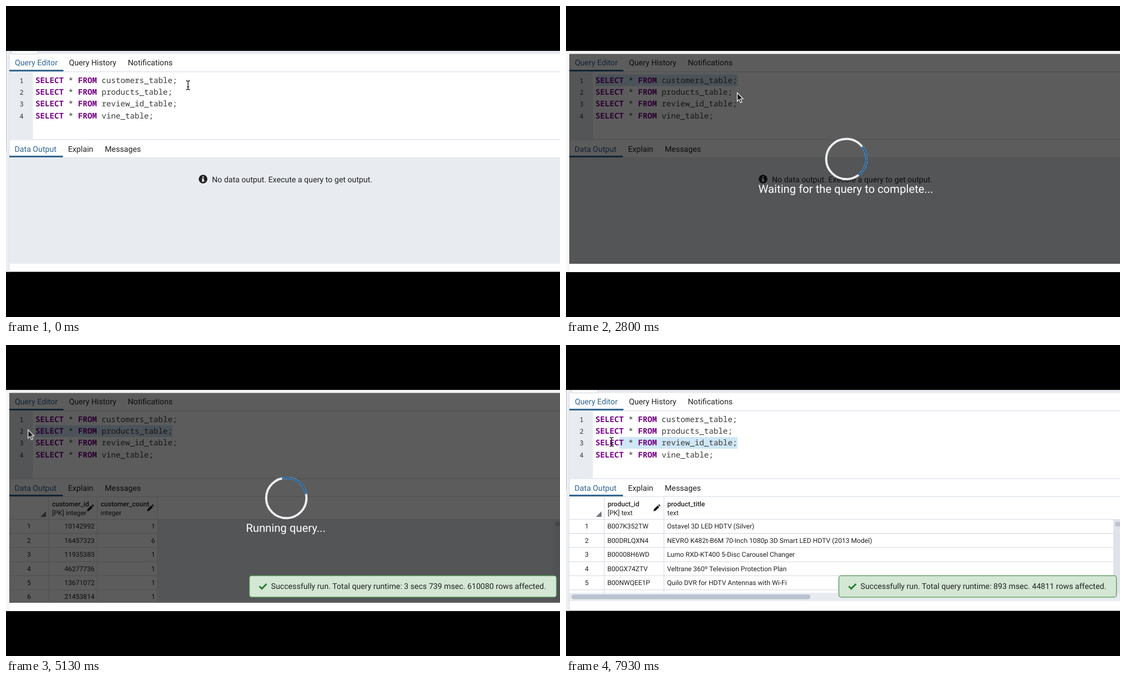
Write an HTML page that moves like this. It is 998 by 561 pixels and loops after 8000 ms.

```html
<!DOCTYPE html>
<html lang="en">
<head>
<meta charset="utf-8">
<title>Query editor</title>
<style>
html, body { margin: 0; width: 100%; height: 100%; overflow: hidden; background: #000; }
svg { display: block; width: 998px; height: 561px; text-rendering: geometricPrecision; }
text { font: 14.18px Roboto, sans-serif; fill: #222; white-space: pre; }
.code { font: 14.2px "Noto Sans Mono", monospace; fill: #3a3a3a; }
.code tspan { font-weight: 600; fill: #770088; }
.num { font: 12px "Noto Sans Mono", monospace; fill: #333; }
.cell { font-size: 12.1px; }
.head { font-weight: 500; }
.wait { font-size: 20.25px; fill: #fff; text-anchor: middle; }
.active { fill: #2f6392; }
.mid { text-anchor: middle; }
.end { text-anchor: end; }
.line { stroke: #dadfe5; stroke-width: 1.3; fill: none; }
.sel { fill: #cfe7f6; }

/* hard switches */
.empty, .grid1, .grid2, .load1, .load2, .run1, .run2, .done1, .done2, .beam, .arrow {
  animation: 8s step-end infinite;
}
.empty { animation-name: empty; }
.grid1 { animation-name: grid1; }
.grid2 { animation-name: grid2; }
.load1 { animation-name: load1; }
.load2 { animation-name: load2; }
.run1 { animation-name: run1; }
.run2 { animation-name: run2; }
.done1 { animation-name: done1; }
.done2 { animation-name: done2; }
.beam { animation-name: beam; }
.arrow { animation-name: arrow; }
@keyframes empty { 0% { opacity: 1 } 41.625%, 100% { opacity: 0 } }
@keyframes grid1 { 0% { opacity: 0 } 41.625% { opacity: 1 } 80%, 100% { opacity: 0 } }
@keyframes grid2 { 0% { opacity: 0 } 80%, 100% { opacity: 1 } }
@keyframes load1 { 0% { opacity: 0 } 29.125% { opacity: 1 } 37.5%, 100% { opacity: 0 } }
@keyframes load2 { 0% { opacity: 0 } 60.875% { opacity: 1 } 72.5%, 100% { opacity: 0 } }
@keyframes run1 { 0% { opacity: 1 } 32.5%, 100% { opacity: 0 } }
@keyframes done1 { 0% { opacity: 0 } 32.5%, 100% { opacity: 1 } }
@keyframes run2 { 0% { opacity: 1 } 67.5%, 100% { opacity: 0 } }
@keyframes done2 { 0% { opacity: 0 } 67.5%, 100% { opacity: 1 } }
@keyframes beam {
  0% { opacity: 1 } 10% { opacity: 0 } 41.625% { opacity: 1 }
  55% { opacity: 0 } 81.25%, 100% { opacity: 1 }
}
@keyframes arrow {
  0% { opacity: 0 } 10% { opacity: 1 } 17.5% { opacity: 0 } 26.25% { opacity: 1 }
  41.625% { opacity: 0 } 55% { opacity: 1 } 81.25%, 100% { opacity: 0 }
}

/* pointer paths */
.beam-move { animation: beam-move 8s linear infinite; }
.arrow-move { animation: arrow-move 8s linear infinite; }
@keyframes beam-move {
  0%, .875% { transform: translate(328px, 143px) }
  3.75% { transform: translate(310px, 134px) }
  10%, 41.62% { transform: translate(49px, 138px) }
  41.625% { transform: translate(312px, 160px) }
  45.875%, 48.375% { transform: translate(303px, 154px) }
  52.5%, 52.9% { transform: translate(91px, 153px) }
  55%, 81.24% { transform: translate(48px, 154px) }
  81.25% { transform: translate(60px, 156px) }
  88.375%, 94.125% { transform: translate(311px, 176px) }
  99.125%, 100% { transform: translate(82px, 175px) }
}
@keyframes arrow-move {
  0%, 10% { transform: translate(40px, 138px) }
  10.875%, 17.5% { transform: translate(-2px, 138px) }
  26.25% { transform: translate(0, 150px) }
  33.5%, 41.62% { transform: translate(308px, 156px) }
  55% { transform: translate(45px, 153px) }
  56.25%, 80% { transform: translate(39.3px, 152.5px) }
  81.25%, 100% { transform: translate(60px, 155px) }
}

/* selections grow to the left, one character at a time */
.sel1 { animation: sel1 8s linear infinite; }
.sel2 { animation: sel2 8s linear infinite; }
.sel3 { animation: sel3 8s linear infinite; }
@keyframes sel1 {
  0%, 3.75% { x: 309px; width: 0; animation-timing-function: steps(30) }
  10%, 48.374% { x: 53px; width: 256px }
  48.375%, 100% { x: 309px; width: 0 }
}
@keyframes sel2 {
  0%, 48.375% { x: 300.5px; width: 0; animation-timing-function: steps(23) }
  52.5% { x: 104.2px; width: 196.3px }
  52.9% { x: 104.2px; width: 196.3px; animation-timing-function: steps(6) }
  55.875%, 94.124% { x: 53px; width: 247.5px }
  94.125%, 100% { x: 300.5px; width: 0 }
}
@keyframes sel3 {
  0%, 94.125% { x: 309px; width: 0; animation-timing-function: steps(25) }
  99.125%, 100% { x: 96px; width: 213px }
}

/* messages */
.toast1 { animation: toast1 8s linear infinite; }
.toast2 { animation: toast2 8s linear infinite; }
@keyframes toast1 {
  0%, 41.625% { opacity: 0; transform: translate(300px, 0) }
  45.875%, 74.125% { opacity: 1; transform: none }
  75%, 79.9% { opacity: 1; transform: translate(0, -2px) }
  80.875%, 85% { opacity: 1; transform: translate(0, -45px) }
  88.375%, 100% { opacity: 0; transform: translate(0, -45px) }
}
@keyframes toast2 {
  0%, 79.9% { opacity: 0; transform: translate(300px, 0) }
  81.7%, 100% { opacity: 1; transform: none }
}

.spin { transform-origin: 505px 276px; animation: spin 1s linear infinite; }
@keyframes spin {
  from { transform: rotate(var(--a)) }
  to { transform: rotate(calc(var(--a) + 360deg)) }
}
</style>
</head>
<body>
<svg viewBox="0 0 998 561">
  <defs>
    <clipPath id="screen"><rect y="81" width="998" height="398.5"/></clipPath>
    <clipPath id="table"><rect x="6" y="274" width="992" height="188"/></clipPath>
    <path id="pencil" d="M-6 6L-5 2L1.6 -4.6L4.6 -1.6L-2 5ZM2.5 -5.5L3.6 -6.3Q4.4 -6.6 5.1 -6L6 -5.1Q6.7 -4.3 6.2 -3.5L5.5 -2.5Z" fill="#1c1c1c"/>
  </defs>
  <g clip-path="url(#screen)">
    <rect y="81" width="998" height="399" fill="#fff"/>
    <rect y="81" width="998" height="5.5" fill="#e6e9ed"/>
    <path d="M10 81v5.5h47.5v-5.5z" fill="#fff" stroke="#cdd2d8"/>
    <rect y="81" width="5.5" height="399" fill="#eceef2"/>
    <path d="M.5 81v181" stroke="#b9bfc9"/>
    <path d="M5.8 86v394M6 118.7h992M6 241.2h992M6 273.7h992" class="line"/>
    <rect x="6" y="119.4" width="42.5" height="121.3" fill="#e8ebf0"/>
    <rect x="6" y="115" width="97.5" height="3" fill="#326690"/>
    <rect x="6" y="270" width="96.5" height="3" fill="#326690"/>
    <text x="16" y="107" class="active">Query Editor</text>
    <text x="113.5" y="107">Query History</text>
    <text x="219.5" y="107">Notifications</text>
    <text x="15.5" y="262.5" class="active">Data Output</text>
    <text x="111.7" y="262.5">Explain</text>
    <text x="178" y="262.5">Messages</text>

    <rect class="sel sel1" y="123.3" height="21.3"/>
    <rect class="sel sel2" y="144.6" height="21.3"/>
    <rect class="sel sel3" y="165.9" height="21.3"/>
    <g id="code"></g>

    <g class="empty">
      <rect x="6" y="274.3" width="992" height="190.7" fill="#e8ebf0"/>
      <circle cx="355" cy="312.3" r="7.8" fill="#1f1f1f"/>
      <path d="M353.7 307.4h2.7v2.2h-2.7zM352.8 310.9h3.5v4.1h1v1.8h-4.7v-1.8h1.1v-2.3h-.9z" fill="#fff"/>
      <text x="371" y="318">No data output. Execute a query to get output.</text>
    </g>
    <g class="grid1" id="grid1" clip-path="url(#table)"></g>
    <g class="grid2" id="grid2" clip-path="url(#table)"></g>

    <g id="loaders"></g>
    <g class="toast1" id="toast1"></g>
    <g class="toast2" id="toast2"></g>

    <g class="beam"><g class="beam-move">
      <path d="M-3.6 -8.2Q-.6 -8.2 0 -6.6Q.6 -8.2 3.6 -8.2M0 -6.8V6.8M-3.6 8.2Q-.6 8.2 0 6.6Q.6 8.2 3.6 8.2M-1.8 2.8H1.8" fill="none" stroke="#222" stroke-width="1.4"/>
    </g></g>
    <g class="arrow"><g class="arrow-move">
      <path d="M.5 .5V15.6L3.9 12.4L6.5 18.3L9 17.2L6.5 11.5H11Z" fill="#111" stroke="#fff" stroke-width="1.2"/>
    </g></g>
  </g>
</svg>
<script>
const put = (id, html) => document.getElementById(id).innerHTML = html;
const text = (x, y, s, cls = 'cell') => `<text x="${x}" y="${y}" class="${cls}">${s}</text>`;
const box = (x, y, w, h, fill, r = 0) =>
  `<rect x="${x}" y="${y}" width="${w}" height="${h}" fill="${fill}" rx="${r}"/>`;
const pencil = x => `<use href="#pencil" x="${x}" y="294"/>`;
const rowY = i => 331.3 + i * 25.4;

const tables = ['customers', 'products', 'review_id', 'vine'];
put('code', tables.map((name, i) => {
  const y = 138.6 + i * 21.35;
  return text(24.5, y, i + 1, 'num') +
    text(53, y, `<tspan>SELECT</tspan> * <tspan>FROM</tspan> ${name}_table;`, 'code');
}).join(''));

// Header, row lines and column lines shared by both result tables
function frame(right, cols, rows, bottom) {
  let d = `M6 314.6H998`;
  for (let i = 1; i <= rows; i++) d += `M6 ${314.6 + i * 25.4}H${right}`;
  for (const x of cols) d += `M${x} 274V${bottom}`;
  const c = cols[0];
  return box(6, 274.3, 992, 40, '#fff') + box(6, 314.6, right - 6, 148, '#fff') +
    `<path d="${d}" class="line"/><path d="M${c - 5} 300v10h-10z" fill="#777"/>`;
}
const scroll = box(986, 315.2, 12, 147, '#dfe3e9') + box(989.5, 319, 9, 8.5, '#bac2d0', 4);

const customers = [[10142992, 1], [16457323, 6], [11935383, 1], [46277736, 1], [13671072, 1], [21453814, 1]];
put('grid1', box(6, 274, 992, 188, '#e8ebf0') + scroll +
  frame(273, [77, 164.5, 273], 5, 462) +
  text(83, 291, 'customer_id', 'cell head') + text(83, 307, '[PK] integer') + pencil(152) +
  text(170.5, 291, 'customer_count', 'cell head') + text(170.5, 307, 'integer') + pencil(260) +
  customers.map(([id, n], i) => text(41.5, rowY(i), i + 1, 'cell mid') +
    text(159.5, rowY(i), id, 'cell end') + text(268.5, rowY(i), n, 'cell end')).join(''));

const products = [
  ['B007K352TW', 'Ostavel 3D LED HDTV (Silver)'],
  ['B00DRLQXN4', 'NEVRO K482t-B6M 70-Inch 1080p 3D Smart LED HDTV (2013 Model)'],
  ['B00008H6WD', 'Lumo RXD-KT400 5-Disc Carousel Changer'],
  ['B00GX74ZTV', 'Veltrane 360º Television Protection Plan'],
  ['B00NWQEE1P', 'Quilo DVR for HDTV Antennas with Wi-Fi']
];
put('grid2', frame(986, [69, 176.5], 5, 447) + scroll +
  box(6, 447, 992, 15, '#e8ebf0') + box(10, 450, 430, 8.5, '#bac2d0', 4) +
  text(75, 291, 'product_id', 'cell head') + text(75, 307, '[PK] text') + pencil(163.5) +
  text(182.5, 291, 'product_title', 'cell head') + text(182.5, 307, 'text') +
  products.map(([id, title], i) => text(37.5, rowY(i), i + 1, 'cell mid') +
    text(74.5, rowY(i), id) + text(182, rowY(i), title)).join(''));

const ring = (color, extra) =>
  `<circle cx="505" cy="276" r="36.3" fill="none" stroke="${color}" stroke-width="4" ${extra}/>`;
const loader = (n, angle) => `<g class="load${n}">` +
  box(0, 81, 998, 5.5, '#f1f2f2') + box(0, 86, 5.5, 394, '#f8f8f8') +
  box(6, 465, 992, 15, '#fff') +
  `<rect x="6" y="86.5" width="992" height="378.5" opacity=".64"/>` +
  ring('#eceef1', '') +
  `<g class="spin" style="--a:${angle}deg">` +
  ring('#2c6596', 'pathLength="360" stroke-dasharray="91 269" stroke-dashoffset="45.5"') + '</g>' +
  text(504, 336.5, 'Running query...', `wait run${n}`) +
  text(504, 336.5, 'Waiting for the query to complete...', `wait done${n}`) + '</g>';
put('loaders', loader(1, 79) + loader(2, -104));

const toast = (x, msg) =>
  `<rect x="${x}" y="416.2" width="${991.6 - x}" height="38.6" rx="4" fill="#d3e7d4" stroke="#4c9a52" stroke-width="1.3"/>` +
  `<path d="M${x + 18} 435.2l4.4 4.4l8.4 -8.6" fill="none" stroke="#287c30" stroke-width="3"/>` +
  text(x + 39, 440.3, msg, '');
put('toast1', toast(438.5, 'Successfully run. Total query runtime: 3 secs 739 msec. 610080 rows affected.'));
put('toast2', toast(491.5, 'Successfully run. Total query runtime: 893 msec. 44811 rows affected.'));
</script>
</body>
</html>
```
